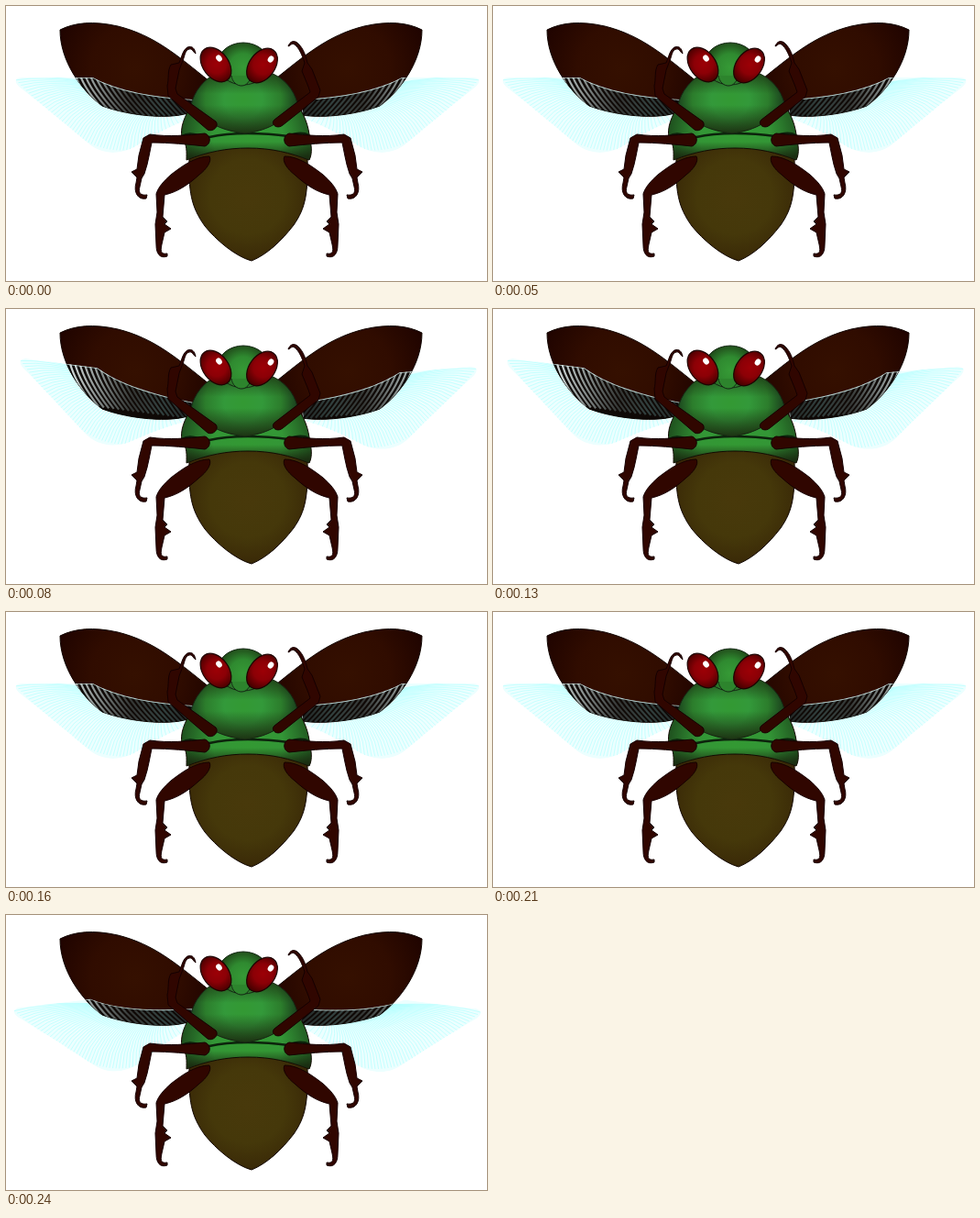
Write an HTML page with a canvas that moves like this. It is 525 px wide and 300 px high and loops after 320 ms.

```html
<!DOCTYPE html>
<html lang="en">
<head>
<meta charset="utf-8">
<title>Beetle</title>
<style>
html, body { margin: 0; width: 100%; height: 100%; overflow: hidden; background: #fff; }
canvas { display: block; }
</style>
</head>
<body>
<canvas id="stage" width="525" height="300"></canvas>
<script>
const ctx = document.getElementById('stage').getContext('2d');
const STEP = 80;
// Wing angles in degrees: [left, right], positive lifts the tip.
const BEATS = [[0, 0], [7.3, 4.6], [0, 0], [-7, -7.4]];
const PIVOT = [205, 108];
const COVER_AXIS = 513, WING_AXIS = 527, LEG_AXIS = 526;

const cover = new Path2D('M59 26C75 18 95 16 122 22C162 32 187 54 222 82L205 114C190 124 140 122 105 109C82 92 59 60 59 26Z');
const wing = new Path2D('M204 102C165 100 122 93 95 78L18 78C10 78 8 82 14 88C40 108 60 125 90 150C105 163 125 162 140 154C160 142 180 130 204 122Z');
const abdomen = new Path2D('M200 164C199 203 202 219 217 240C229 255 250 273 268 278C285 271 300 257 314 239C327 220 330 205 329 162C286 148 236 149 200 164Z');
const thorax = new Path2D('M204 105C194 122 190 132 192 144C198 151 197 159 197 168C220 159 241 155 264 155C290 155 310 160 331 168C335 160 333 151 331 140C329 125 322 112 314 103Z');
const seam = new Path2D('M192 142C202 136 211 143 222 143C235 140 248 139 264 139C282 139 294 140 308 142C317 138 325 138 331 141');
const shield = new Path2D('M231 73C216 79 205 94 202 108C212 124 233 136 261 139C287 136 308 123 318 106C314 91 304 79 289 73Z');
const mouth = new Path2D('M246 76C247 83 252 87 257 87C263 87 266 82 268 76');

const foreLeft = new Path2D('M207 52C206 46 203 43 198 45C193 48 192 55 189 62L180 64C176 70 178 80 176 87L177 98L220 135C226 138 233 131 229 126L187 96L185 90L189 70L192 62C195 56 195 48 200 47C203 46 204 50 207 52Z');
const foreRight = new Path2D('M308 44C310 38 315 37 319 41C325 47 327 54 329 62L334 69L343 92L341 99L302 130C296 135 288 129 293 124L332 94L330 88L323 71L326 62C323 53 320 46 315 42C312 40 311 43 308 44Z');
const midLeg = new Path2D('M217 139C224 141 224 151 217 153C199 151 178 149 159 149L156 164L154 173L151 183L148 188L146 197C144 204 147 207 154 206L153 210C144 212 139 203 142 193L143 187L137 181L143 178L145 163L150 144L157 140C178 143 198 141 217 139Z');
const hindLeg = new Path2D('M222 164C225 169 219 178 211 184C199 195 187 203 173 206L171 230L176 235L173 238L180 243L173 247L170 260C168 269 170 271 176 270L176 273C168 276 164 270 164 261L163 238L165 225L164 205C166 198 172 191 180 184C193 174 207 164 222 164Z');

function mirror(axis) {
  ctx.translate(axis, 0);
  ctx.scale(-1, 1);
}

function addStops(gradient, colors) {
  colors.forEach((c, i) => gradient.addColorStop(i / (colors.length - 1), c));
  return gradient;
}

function radial(x, y, r, ...colors) {
  return addStops(ctx.createRadialGradient(x, y, 0, x, y, r), colors);
}

function linear(x0, y0, x1, y1, ...colors) {
  return addStops(ctx.createLinearGradient(x0, y0, x1, y1), colors);
}

function paint(path, fill, line = '#100500', width = 1) {
  ctx.fillStyle = fill;
  ctx.fill(path);
  ctx.strokeStyle = line;
  ctx.lineWidth = width;
  ctx.stroke(path);
}

function shade(path, top, bottom, color) {
  ctx.fillStyle = linear(0, top, 0, bottom, 'rgba(24,32,12,0)', color);
  ctx.fill(path);
}

function bothSides(axis, draw) {
  for (const flip of [false, true]) {
    ctx.save();
    if (flip) mirror(axis);
    draw(flip);
    ctx.restore();
  }
}

function poseWing(flip, angle) {
  if (flip) mirror(WING_AXIS);
  ctx.translate(...PIVOT);
  ctx.rotate(angle * Math.PI / 180);
  ctx.translate(-PIVOT[0], -PIVOT[1]);
}

function cubic(a, b, c, d, t) {
  const u = 1 - t;
  return u * u * u * a + 3 * u * u * t * b + 3 * u * t * t * c + t * t * t * d;
}

function curve(x0, y0, cx, cy, x1, y1) {
  ctx.beginPath();
  ctx.moveTo(x0, y0);
  ctx.quadraticCurveTo(cx, cy, x1, y1);
  ctx.stroke();
}

function drawWing(flip, angle) {
  ctx.save();
  poseWing(flip, angle);
  ctx.clip(wing);
  ctx.fillStyle = 'rgba(130,255,255,.15)';
  ctx.fill(wing);
  ctx.strokeStyle = 'rgba(110,255,255,.38)';
  ctx.lineWidth = 0.8;
  const veins = 56;
  for (let i = 0; i <= veins; i++) {
    const t = i / veins;
    curve(203, 103 + 14 * t, 60 + 110 * t, 72 + 25 * t,
      cubic(8, 60, 110, 200, t), cubic(78, 130, 200, 124, t));
  }
  ctx.restore();
}

// Where the wing crosses its dark cover, it shows as pale streaks on black.
function drawSheen(flip, angle) {
  ctx.save();
  if (flip) mirror(COVER_AXIS);
  ctx.clip(cover);
  if (flip) mirror(COVER_AXIS);
  poseWing(flip, angle);
  ctx.clip(wing);
  ctx.fillStyle = 'rgba(4,8,8,.75)';
  ctx.fill(wing);
  ctx.strokeStyle = linear(70, 0, 205, 0, 'rgba(235,245,245,.85)', 'rgba(200,215,215,.6)',
    'rgba(120,140,140,.35)', 'rgba(90,130,130,.45)', 'rgba(80,110,110,.3)');
  ctx.lineWidth = 2.2;
  for (let x = 46; x < 205; x += 5.5) curve(x, 70, x + 6, 92, x + 34, 120);
  ctx.strokeStyle = 'rgba(215,245,245,.8)';
  ctx.lineWidth = 1.6;
  ctx.stroke(wing);
  ctx.restore();
}

function drawEye(x, y, tilt, shineX, shineY) {
  const eye = new Path2D();
  eye.ellipse(x, y, 14, 21, tilt, 0, 7);
  paint(eye, radial(x + 1, y - 1, 21, '#9c0006', '#8c0006', '#4a0000'), '#1c0000', 1.2);
  ctx.fillStyle = '#fff';
  ctx.beginPath();
  ctx.ellipse(shineX, shineY, 3, 3.8, tilt, 0, 7);
  ctx.fill();
}

function drawBody() {
  paint(abdomen, radial(264, 208, 82, '#48390b', '#45380a', '#352306'));
  paint(thorax, radial(264, 144, 76, '#339933', '#339636', '#1d4a1c'));
  shade(thorax, 148, 164, 'rgba(24,32,12,.75)');
  ctx.strokeStyle = '#0c230c';
  ctx.lineWidth = 2.5;
  ctx.stroke(seam);
  paint(shield, radial(259, 102, 62, '#339933', '#33993a', '#2c7d2c', '#17351a'), '#142814');
  shade(shield, 108, 139, 'rgba(24,32,12,.8)');
  shade(shield, 96, 72, 'rgba(24,32,12,.6)');

  const head = new Path2D();
  head.ellipse(259, 63, 28, 23, 0, 0, 7);
  paint(head, radial(259, 67, 30, '#369a36', '#2f8a30', '#1e4016'), '#142814');
  paint(mouth, '#2d842d', '#142814');
  drawEye(229, 64, -0.64, 232.5, 57);
  drawEye(279.5, 65, 0.64, 289, 58);
}

function drawLegs() {
  const shell = '#300600';
  bothSides(LEG_AXIS, () => {
    paint(midLeg, shell, '#150000');
    paint(hindLeg, shell, '#150000');
  });
  paint(foreLeft, shell, '#150000');
  paint(foreRight, shell, '#150000');
}

function draw(now) {
  const [left, right] = BEATS[Math.floor(now / STEP) % BEATS.length];
  ctx.fillStyle = '#fff';
  ctx.fillRect(0, 0, 525, 300);
  drawWing(false, left);
  drawWing(true, right);
  bothSides(COVER_AXIS, () => paint(cover, radial(140, 68, 95, '#351000', '#300c00', '#1e0300')));
  drawSheen(false, left);
  drawSheen(true, right);
  drawBody();
  drawLegs();
}

const start = performance.now();
function tick() {
  draw(performance.now() - start);
  requestAnimationFrame(tick);
}
tick();
</script>
</body>
</html>
```
